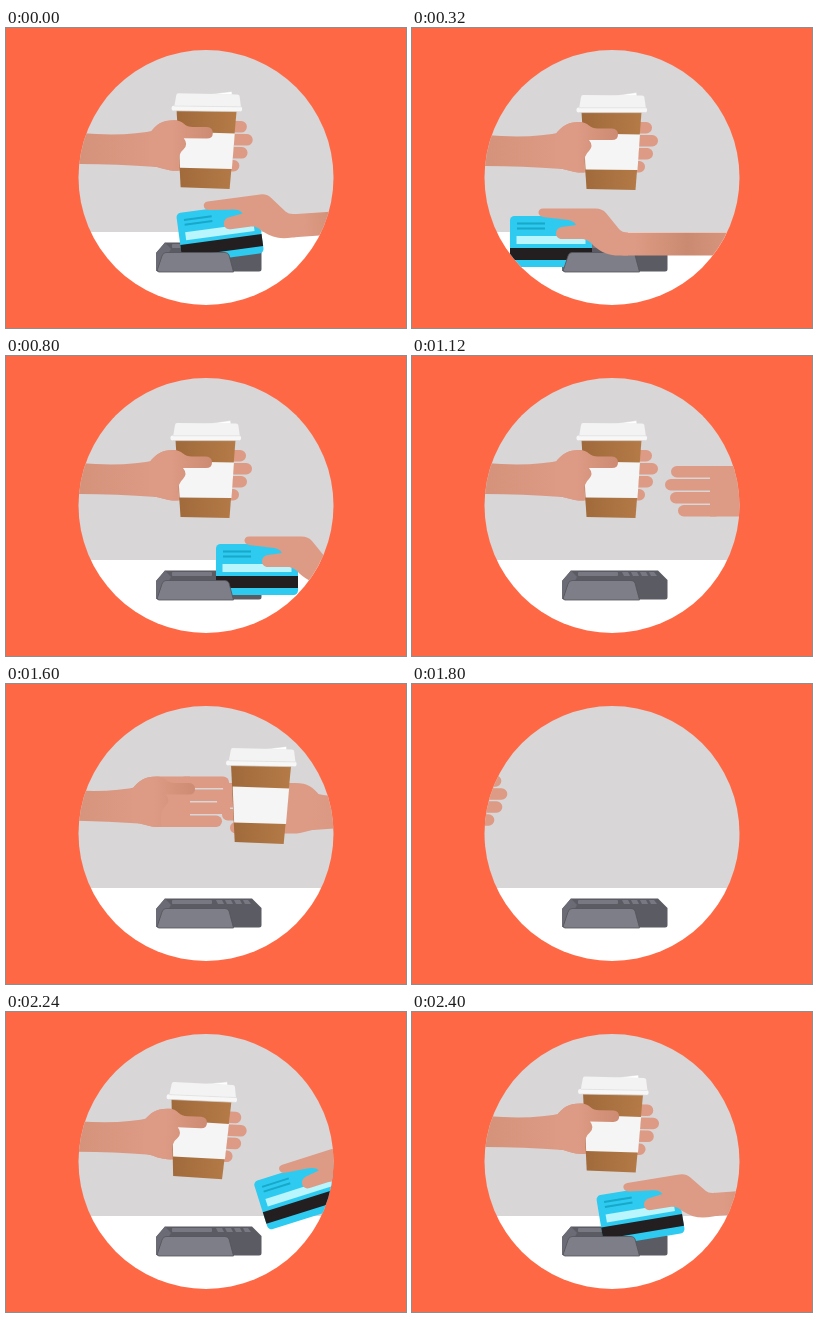
An HTML page for the animation above (2440 ms loop, 400 px wide and 300 px high).

```html
<!DOCTYPE html>
<html>
<head>
<meta charset="utf-8">
<style>
  html, body { margin: 0; width: 100%; height: 100%; overflow: hidden; background: #ff6845; }
  svg { display: block; width: 100%; height: 100%; }
</style>
</head>
<body>
<svg viewBox="0 0 400 300">
  <defs>
    <clipPath id="porthole"><circle cx="200" cy="149.5" r="127.5"/></clipPath>
    <linearGradient id="skin" gradientUnits="userSpaceOnUse" x1="60" x2="150" y1="0" y2="0">
      <stop offset="0" stop-color="#d4917a"/>
      <stop offset="1" stop-color="#dd9a84"/>
    </linearGradient>
    <linearGradient id="thumbSkin" gradientUnits="userSpaceOnUse" x1="165" x2="206" y1="0" y2="0">
      <stop offset="0" stop-color="#dd9a84"/>
      <stop offset="1" stop-color="#cd8b73"/>
    </linearGradient>
    <linearGradient id="armSkin" gradientUnits="userSpaceOnUse" x1="125" x2="220" y1="0" y2="0">
      <stop offset="0" stop-color="#dd9a84"/>
      <stop offset=".55" stop-color="#ca8a71"/>
      <stop offset="1" stop-color="#d8957e"/>
    </linearGradient>
    <linearGradient id="kraft">
      <stop offset="0" stop-color="#a0693a"/>
      <stop offset="1" stop-color="#b47b47"/>
    </linearGradient>
    <g id="hand" fill="url(#skin)">
      <path id="forearm" d="M-120 107H73Q120 111 150 104V141Q110 138 73 138H-120Z"/>
      <path d="M143 107C150 98 155 94 168 94H201V144.5H172C160 145 155 141 143 139.500Z"/>
      <rect x="190" y="94" width="50" height="11.500" rx="5.750"/>
      <rect x="190" y="107" width="56" height="11.500" rx="5.750"/>
      <rect x="190" y="120" width="51" height="11.500" rx="5.750"/>
      <rect x="190" y="133" width="43" height="11.500" rx="5.750"/>
    </g>
  </defs>

  <rect width="400" height="300" fill="#ff6845"/>
  <g clip-path="url(#porthole)">
    <rect width="400" height="204" fill="#d8d6d7"/>
    <rect y="204" width="400" height="96" fill="#fff"/>

    <g id="terminal">
      <path d="M150 225L159 214.500H246L255.500 224V241Q255.500 243.500 253 243.500H152Q150 243.500 150 241Z" fill="#5b5b63"/>
      <path d="M150 225L159 214.500L165 221L152 243H150Z" fill="#6a6b74"/>
      <rect x="166" y="216" width="40" height="4" rx="1" fill="#777881"/>
      <path d="M210 216h6l2 4h-6zm9 0h6l2 4h-6zm9 0h6l2 4h-6zm9 0h5l3 4h-6z" fill="#777881"/>
    </g>

    <g id="card">
      <rect width="82" height="51" rx="4.500" fill="#2ecaf0"/>
      <path d="M7 7.500H35M7 12.500H35" stroke="#17a8ca" stroke-width="2"/>
      <rect x="6.500" y="20" width="69" height="8" fill="#b9f5fd"/>
      <rect y="32" width="82" height="12" fill="#231f20"/>
    </g>

    <path d="M160 224.500H219Q222 224.500 223 227L227.500 244H153Q151 244 151.500 241.500L156 228Q157 224.500 160 224.500Z" fill="#7d7e87" stroke="#53535b" stroke-width=".8"/>

    <g id="cardHand" fill="url(#armSkin)">
      <path id="cardArm" d="M340 16.500H115Q108 16.500 106 22V34Q108 39.500 115 39.500H340Z"/>
      <path d="M33 -7.500H84Q92 -8 96 -3L109 13Q112 16.500 118 16.500V39.500H112C100 40 92 37 84 30C79 25 77 23 71 23H52C44 23 44 12 52 11L66 9C64 5 60 4 54 3.500L33 1C27 0 27 -7.500 33 -7.500Z"/>
    </g>

    <g id="rightHand"><use href="#hand" transform="translate(496 16) scale(-1 1)"/></g>
    <g id="leftBack"><use href="#hand"/></g>

    <g id="cup">
      <path d="M169.500 84H229.500L223.500 162L174.500 161Z" fill="url(#kraft)"/>
      <path d="M171.500 105.500L228 106.500L225.500 142L173.600 141.500Z" fill="#f5f5f6"/>
      <path d="M200 68L224.500 64.500L225 68Z" fill="#fff" stroke="#d5d5d5" stroke-width=".5"/>
      <path d="M171 67L230 67.500Q232 67.500 232.300 69L234 81H167L169 69Q169.300 67 171 67Z" fill="#f3f3f4"/>
      <rect x="164.500" y="79.500" width="70.500" height="5" rx="2" fill="#f7f7f7"/>
      <path d="M167 79.800H234M167 84.600H233" stroke="#dcdcdc" stroke-width=".7"/>
    </g>

    <g id="leftFront">
      <path d="M143 107C150 98 155 94 168 94Q173 94 177 97.500T187 100.500H200Q206 101 206 106.500T200 112H177Q182 118 177 123Q172 127 172 137V144.500C160 145 155 141 143 139.500Z" fill="url(#thumbSkin)"/>
    </g>
  </g>
</svg>
<script>
const LOOP = 2440, CUT = 1880;   // the stage is empty at CUT
const CUP_CENTER = "200 115";

// Progress from 0 to 1 between two times.
const span = (t, from, to) => Math.min(1, Math.max(0, (t - from) / (to - from)));

const turn = (id, r, pivot) =>
  document.getElementById(id).setAttribute("transform", `rotate(${r} ${pivot})`);

function place(id, x, y, r = 0, pivot = "0 0") {
  document.getElementById(id).setAttribute("transform", `translate(${x} ${y}) rotate(${r} ${pivot})`);
}

function moveCup(t) {
  const enter = 1 - span(t, 1920, 2400);
  const settle = (1 - span(t, 2400, 2760)) ** 3;
  const leave = Math.max(0, t - 3800) / 240;
  const grab = (1 - Math.cos(Math.PI * span(t, 3380, 3740))) / 2;

  const x = settle - 172 * enter ** 3;
  const y = 56 * enter ** 2 - 2 * settle;
  const tilt = 13.5 * enter ** 2 + settle;
  const pulled = 55 * leave ** 2;

  place("cup", x + pulled, y - 2.5 * leave, tilt + leave, CUP_CENTER);
  for (const id of ["leftBack", "leftFront"])
    place(id, x - 17 * leave ** 3.6, y - 1.5 * leave, tilt, CUP_CENTER);
  turn("forearm", -tilt, "145 122");
  place("rightHand", 100 - 194 * grab + pulled, 8.5 * (Math.sin(Math.PI * grab) - 1) - 2.5 * leave);
}

function moveCard(t) {
  const enter = 1 - span(t, 1980, 2760);
  const swipe = Math.max(0, t - 2760) / 480;
  const x = 98 + 274 * enter ** 1.5 + 112 * swipe ** 2.35;
  const y = 188 - 92 * enter ** 4;
  const tilt = -35 * enter ** 1.7;

  for (const id of ["card", "cardHand"]) place(id, x, y, tilt);
  turn("cardArm", -tilt / 2, "116 28");
}

const start = performance.now();
function draw() {
  const now = Math.floor((performance.now() - start) / 40) * 40 % LOOP;
  const t = now < CUT ? now + LOOP : now;
  moveCup(t);
  moveCard(t);
  requestAnimationFrame(draw);
}
draw();
</script>
</body>
</html>
```
